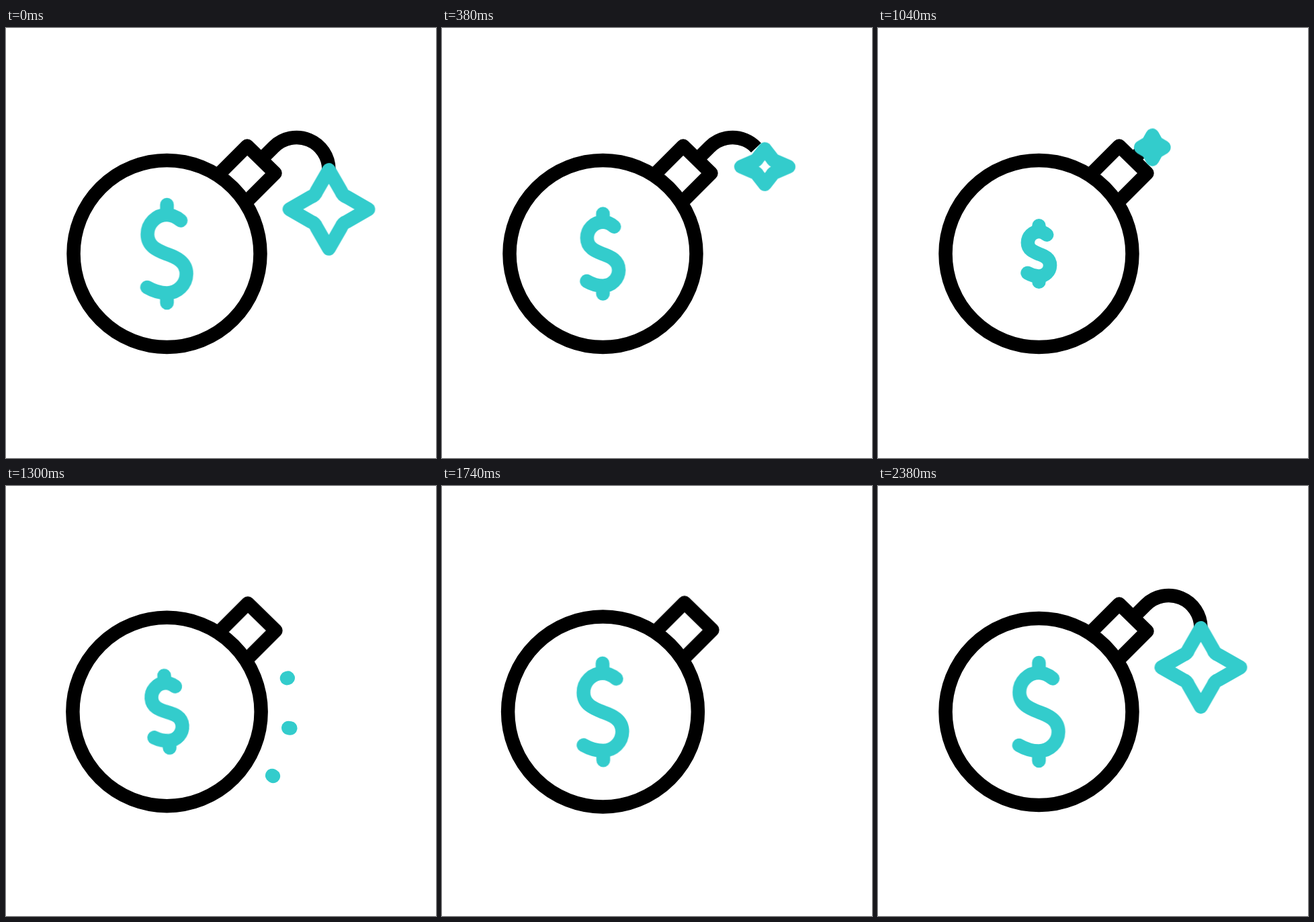
An HTML page without scripts that plays this animation: 640 px wide and 640 px high, repeating every 2400 ms.

```html
<!DOCTYPE html>
<html lang="en">
<head>
<meta charset="utf-8">
<title>Money bomb</title>
<style>
  html, body { margin: 0; width: 100%; height: 100%; overflow: hidden; background: #fff; }
  svg { display: block; width: 100vw; height: 100vh; }

  svg * {
    fill: none;
    stroke-width: 20.5px;
    stroke-linejoin: round;
    animation: 2400ms linear infinite;
  }
  .body, .neck, .fuse { stroke: #000; }
  .dollar, .star, .ray { stroke: #33cccc; stroke-linecap: round; }
  .dollar, .star { vector-effect: non-scaling-stroke; }

  .body { animation-name: swell; }
  .neck { animation-name: push; }
  .fuse { animation-name: burn; stroke-dasharray: 135 140; }
  .star { animation-name: spark; }
  .dollar { animation-name: squeeze; }
  .ray { animation-name: burst; }

  @keyframes swell {
    0%, 53.67%, 73.67%, 100% { r: 139px; }
    63.67% { r: 160.3px; }
  }
  @keyframes push {
    0%, 53.67%, 73.67%, 100% { transform: none; }
    63.67% { transform: translate(16.8px, -16.6px); }
  }
  @keyframes burn {
    0% { stroke-dashoffset: 0; }
    15.83% { stroke-dashoffset: 36; }
    28.33% { stroke-dashoffset: 66; }
    43.33% { stroke-dashoffset: 110; }
    47%, 73.67% { stroke-dashoffset: 136; }
    89.5%, 100% { stroke-dashoffset: 0; }
  }
  @keyframes spark {
    0% { transform: translate(480.5px, 270px) scale(1, 1); }
    15.83% { transform: translate(480.5px, 206.5px) scale(.6, .445); }
    22.5% { transform: translate(472px, 186px) scale(.78, .68); }
    28.33% { transform: translate(458.2px, 172.2px) scale(.7, .4); }
    35.83% { transform: translate(434px, 165px) scale(.5, .75); }
    43.33% { transform: translate(408.5px, 177.5px) scale(.294, .305); }
    47.5% { transform: translate(394px, 186px) scale(.05, .05); }
    47.6% { transform: translate(394px, 186px) scale(0, 0); }
    90% { transform: translate(480.5px, 270px) scale(0, 0); }
    99.17%, 100% { transform: translate(480.5px, 270px) scale(1, 1); }
  }
  @keyframes squeeze {
    0% { transform: translate(239.5px, 336px) rotate(0deg) scale(1); }
    15.83% { transform: translate(239.5px, 336px) rotate(0deg) scale(.815); }
    28.33% { transform: translate(239.5px, 336px) rotate(0deg) scale(.678); animation-timing-function: ease-out; }
    43.67% { transform: translate(239.5px, 336px) rotate(0deg) scale(.572); }
    53.67% { transform: translate(239.5px, 336px) rotate(-5deg) scale(.73); }
    61.67% { transform: translate(239.5px, 336px) rotate(5deg) scale(.853); }
    70.5% { transform: translate(239.5px, 336px) rotate(-1.2deg) scale(.97); }
    73.67%, 100% { transform: translate(239.5px, 336px) rotate(0deg) scale(1); }
  }
  @keyframes burst {
    0%, 53.6% { stroke-dasharray: 0 200; stroke-dashoffset: 0; opacity: 0; }
    53.67% { stroke-dasharray: 0 200; stroke-dashoffset: 0; opacity: 1; }
    61.67% { stroke-dasharray: 80 200; stroke-dashoffset: -13; }
    63.33% { stroke-dasharray: 70 200; stroke-dashoffset: -30; }
    68.3% { stroke-dasharray: 0 200; stroke-dashoffset: -99; opacity: 1; }
    68.33%, 100% { stroke-dasharray: 0 200; stroke-dashoffset: -99; opacity: 0; }
  }
</style>
</head>
<body>
<svg viewBox="0 0 640 640">
  <path class="fuse" pathLength="135" d="M383 192.6 L398.6 177 A48 48 0 0 1 480.5 211"/>
  <path class="neck" d="M318 216.5 L359 175.5 L400.5 216 L359 257.5"/>
  <circle class="body" cx="239.5" cy="336" r="139"/>
  <path class="dollar" d="M0 -73 V-58 M20.5 -49.5 C14 -55 7 -58 0 -58 A29 29 0 0 0 -29 -29
    C-29 -11 -14 -5 0 .5 C14 5.5 29 12 29 30 A29 29 0 0 1 0 58.5
    C-10 58.5 -20 55.5 -29.5 50 M0 58.5 V73"/>
  <path class="ray" pathLength="100" d="M417.7 286.2 L450.3 276.8"/>
  <path class="ray" pathLength="100" d="M419.8 360 L475 368"/>
  <path class="ray" pathLength="100" d="M395.9 430.8 L427.7 448.3"/>
  <path class="star" d="M0 -58.7 L18.2 -27 Q20.5 -20.5 27 -18.2 L58.7 0
    L27 18.2 Q20.5 20.5 18.2 27 L0 58.7
    L-18.2 27 Q-20.5 20.5 -27 18.2 L-58.7 0
    L-27 -18.2 Q-20.5 -20.5 -18.2 -27 Z"/>
</svg>
</body>
</html>
```
